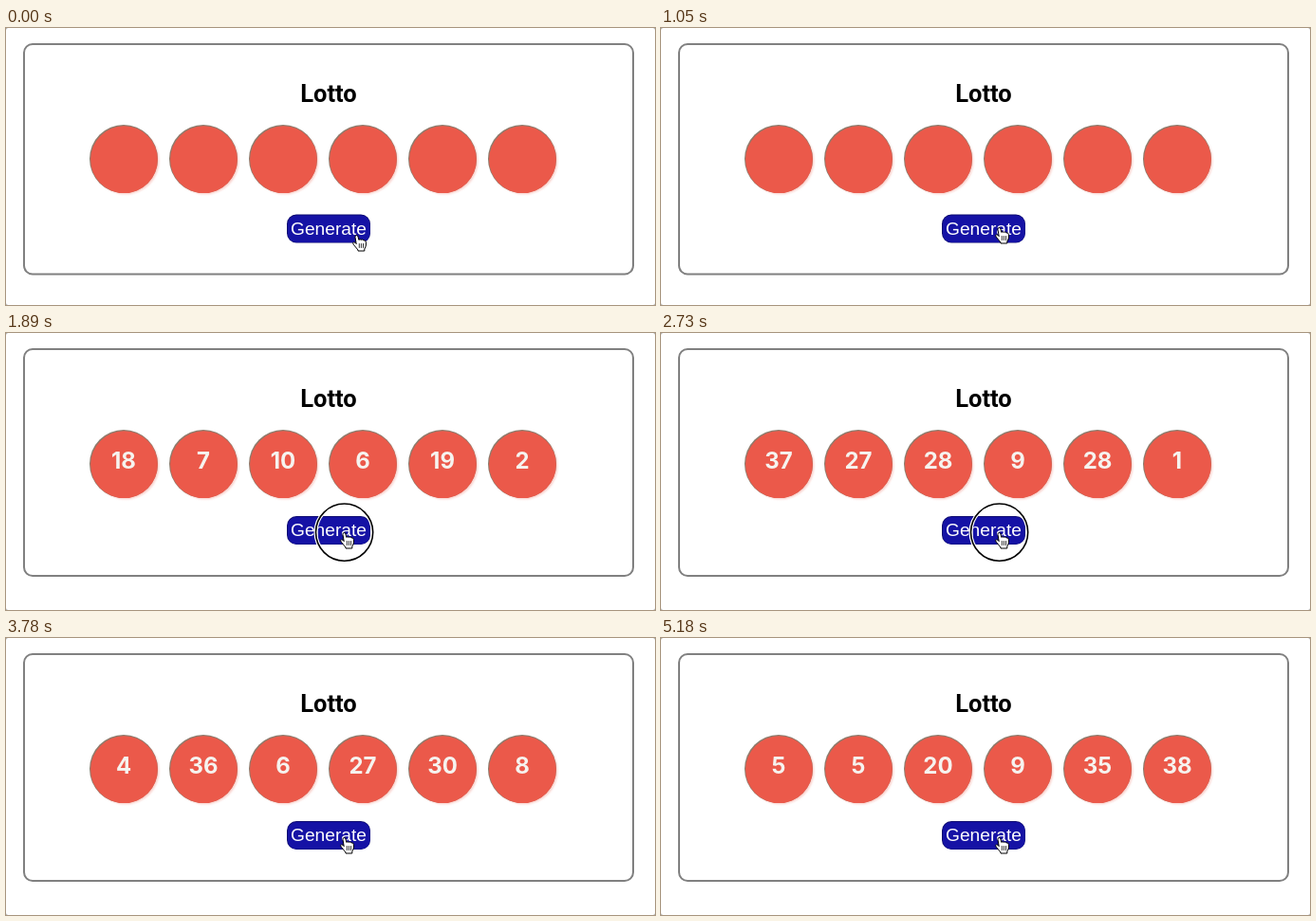
Recreate the animation shown at these times as an HTML page. Size 684 by 292 pixels, loop 5.32 s.

```html
<!DOCTYPE html>
<html lang="en">
<head>
<meta charset="utf-8">
<title>Lotto</title>
<style>
  html, body { margin: 0; width: 100%; height: 100%; overflow: hidden; background: #aaa; }
  svg { display: block; }
  text { text-anchor: middle; }
  .title { font: 700 25.5px Roboto, sans-serif; }
  .number { font: 700 24px Inter, sans-serif; fill: #f6f3ef; }
  .label { font: 19.2px "Liberation Sans", Arial, sans-serif; fill: #fff; }
</style>
</head>
<body>
<svg width="684" height="292" viewBox="0 0 684 292">
  <defs>
    <filter id="soft" x="-20%" y="-20%" width="140%" height="140%"><feGaussianBlur stdDeviation="1"/></filter>
  </defs>
  <rect width="684" height="292" rx="2.5" fill="#fff"/>
  <rect id="card" x="19" y="17" width="642" fill="none" rx="9" stroke="#808080" stroke-width="2"/>
  <text class="title" x="340" y="77.5">Lotto</text>
  <g id="balls"></g>
  <g id="button">
    <rect x="296" y="193" width="88" height="30" rx="10" fill="#0d0a70"/>
    <rect x="297" y="194" width="86.5" height="28.5" rx="9" fill="#1512a5"/>
    <text class="label" x="340" y="214">Generate</text>
  </g>
  <g id="ring" fill="none">
    <circle cx="356.6" cy="210.1" r="30.1" stroke="#fff" stroke-width="4"/>
    <circle cx="356.6" cy="210.1" r="30.1" stroke="#000" stroke-width="1.6"/>
  </g>
  <g id="hand" stroke="#000" stroke-linejoin="round" stroke-linecap="round">
    <path fill="#fff" d="M356 218.5 L355 212.5 Q354.8 210.8 356.2 210.5 T358 212 L358.8 215.3 Q360.2 214.2 361.3 215.3 Q362.8 214.4 363.8 215.8 Q366.2 215.4 366.4 217.8 V221 Q366 223 364.8 225 V227 H358 V226 L353.2 220.2 Q352 218.4 353.4 217.8 Q354.6 217.4 356 219.3 Z"/>
    <path fill="none" stroke-width=".8" d="M359.3 219.5 V223.5 M361.4 219.5 V223.5 M363.5 219.5 V223.5"/>
  </g>
</svg>
<script>
const LOOP = 5320, TICK = 70, RING = 140, GLIDE = 350;
const $ = id => document.getElementById(id);

// Each click: press time, time the new draw appears, and the drawn numbers.
const clicks = [
  [910, 1120, "18 7 10 6 19 2"],
  [1890, 2030, "37 27 28 9 28 1"],
  [2730, 2870, "33 32 40 15 32 26"],
  [3640, 3780, "4 36 6 27 30 8"],
  [4060, 4130, "5 5 20 9 35 38"]
];

$("balls").innerHTML = Array.from({ length: 6 }, (_, i) => {
  const x = 124 + 84 * i;
  return `<circle cx="${x + 2}" cy="140" r="35.3" fill="#f9cfc9" filter="url(#soft)"/>
    <circle cx="${x}" cy="138" r="36" fill="#8d7b6c"/>
    <circle cx="${x + 0.5}" cy="138.7" r="35.4" fill="#eb594a"/>
    <text class="number" x="${x}" y="143"></text>`;
}).join("");
const numbers = document.querySelectorAll(".number");

function draw() {
  const t = performance.now() % LOOP;
  const shown = clicks.findLast(([, reveal]) => reveal <= t);
  const values = shown ? shown[2].split(" ") : [];
  numbers.forEach((el, i) => el.textContent = values[i] ?? "");

  // Empty balls leave the card slightly taller.
  const extra = shown ? 0 : 3.5;
  $("card").setAttribute("height", 239 + extra);
  $("button").setAttribute("transform", `translate(0 ${extra})`);

  // The pointer eases out in ticks towards the button's middle.
  const progress = Math.min(1, Math.floor(t / TICK) * TICK / GLIDE);
  const left = (1 - progress) ** 3;
  $("hand").setAttribute("transform", `translate(${13 * left} ${8 * left})`);

  const pressed = clicks.some(([press, reveal]) => t >= press && t < Math.min(reveal, press + RING));
  $("ring").setAttribute("visibility", pressed ? "visible" : "hidden");
  requestAnimationFrame(draw);
}
draw();
</script>
</body>
</html>
```
